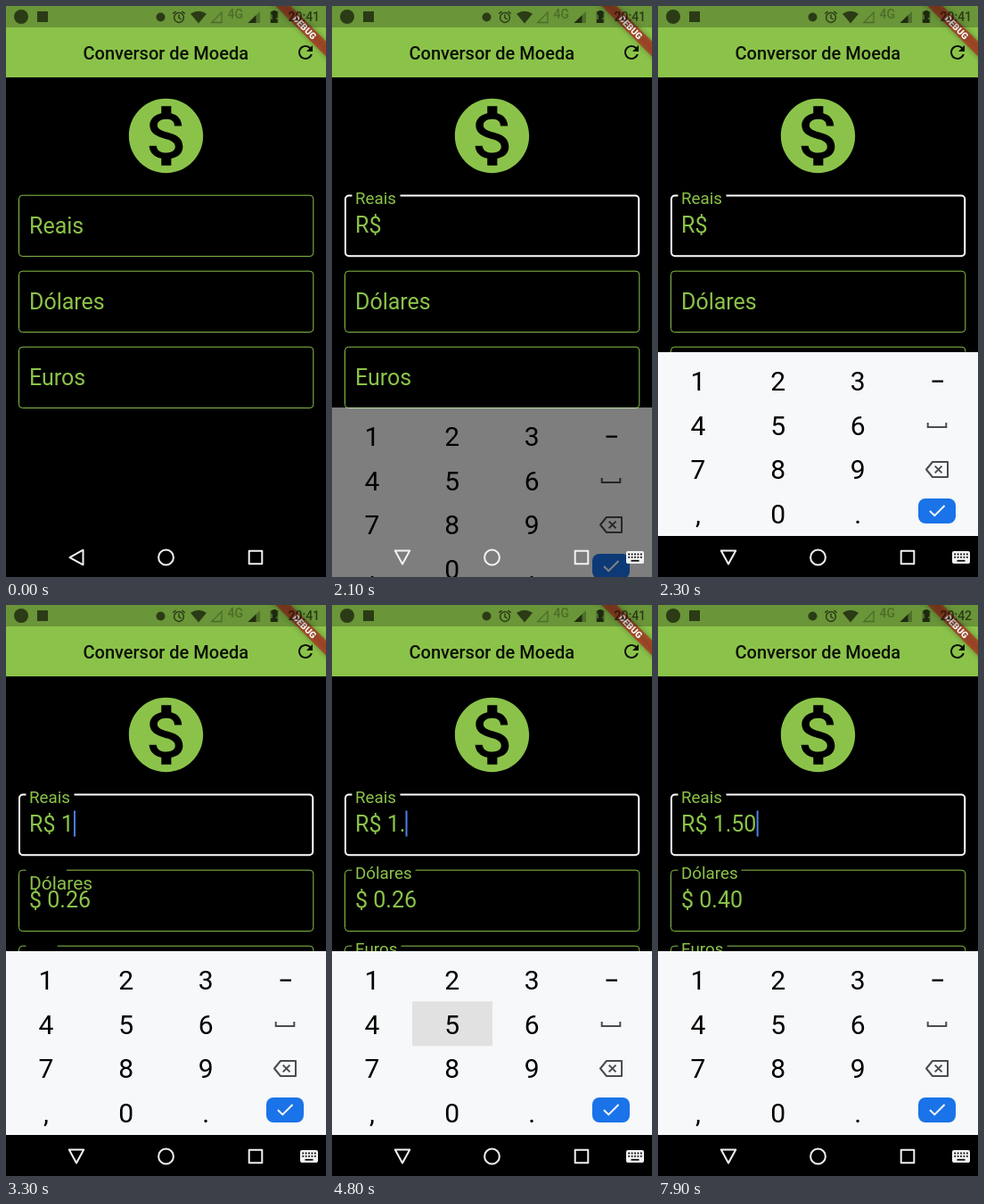
An HTML page for the animation above (8 s loop, 359 by 640 pixels).

```html
<!DOCTYPE html>
<html lang="pt">
<head>
<meta charset="utf-8">
<title>Conversor de Moeda</title>
<style>
  html, body { margin: 0; width: 100%; height: 100%; overflow: hidden; background: #000; }
  svg { display: block; width: 100%; height: 100%; font-family: Roboto, sans-serif; }
</style>
</head>
<body>
<svg id="stage" viewBox="0 0 359 640">
  <rect width="359" height="640"/>
  <rect width="359" height="80" fill="#8bc34a"/>
  <text x="179.3" y="60" font-size="20" font-weight="500" text-anchor="middle" fill="#0b1005">Conversor de Moeda</text>
  <path transform="translate(324 40)" fill="#0b1005" d="M17.65 6.35C16.2 4.9 14.21 4 12 4c-4.42 0-7.99 3.58-7.99 8s3.57 8 7.99 8c3.73 0 6.84-2.55 7.73-6h-2.08c-.82 2.33-3.04 4-5.65 4-3.31 0-6-2.69-6-6s2.69-6 6-6c1.66 0 3.14.69 4.22 1.78L13 11h7V4l-2.35 2.35z"/>
  <path transform="translate(129.5 95.5) scale(4.1667)" fill="#8bc34a" d="M12 2C6.48 2 2 6.48 2 12s4.48 10 10 10 10-4.48 10-10S17.52 2 12 2zm1.41 16.09V20h-2.67v-1.93c-1.71-.36-3.16-1.46-3.27-3.4h1.96c.1 1.05.82 1.87 2.65 1.87 1.96 0 2.4-.98 2.4-1.59 0-.83-.44-1.61-2.67-2.14-2.48-.6-4.18-1.62-4.18-3.67 0-1.72 1.39-2.84 3.11-3.21V4h2.67v1.95c1.86.45 2.79 1.86 2.85 3.39H14.3c-.05-1.11-.64-1.87-2.22-1.87-1.5 0-2.4.68-2.4 1.64 0 .84.65 1.39 2.67 1.91s4.18 1.39 4.18 3.91c-.02 1.83-1.38 2.83-3.12 3.16z"/>

  <g id="fields"></g>
  <rect id="cursor" width="2" fill="#4a80e8"/>

  <!-- ribbon -->
  <g transform="translate(359 0) rotate(45)">
    <rect x="-48" y="28" width="96" height="12" fill="#b71c1c" fill-opacity=".63" style="filter:drop-shadow(0 0 3px rgba(0,0,0,.5))"/>
    <text y="37.6" font-size="10.2" font-weight="900" text-anchor="middle" fill="#fff">DEBUG</text>
  </g>

  <!-- status bar -->
  <rect width="359" height="24" fill-opacity=".24"/>
  <g fill-opacity=".6" stroke-opacity=".6" fill="#000">
    <circle cx="17" cy="12" r="8"/>
    <rect x="35" y="6" width="12" height="12"/>
    <circle cx="173.5" cy="12.5" r="5"/>
    <g fill="none" stroke="#000" stroke-width="1.5">
      <circle cx="194" cy="13" r="5.4"/>
      <path d="M194 9.6V13.3L196.6 14.8M187.3 8.7L190.6 6M200.7 8.7L197.4 6"/>
    </g>
    <path d="M207 8.7Q216 2.6 225 8.7L216 19.5Z"/>
    <path d="M242 7V18.5H230.8Z" fill="none" stroke="#000" stroke-opacity=".27" stroke-width="1.3"/>
    <text x="248.5" y="13.8" font-size="14" font-weight="500" fill-opacity=".27">4G</text>
    <path d="M285 6V19H271.5Z" fill-opacity=".25"/>
    <path d="M280.5 10.3V19H271.5Z"/>
    <path d="M299.3 6V5H302.7V6H305.5V19H296.5V6Z" fill-opacity=".3"/>
    <path d="M299.3 6V5H302.7V6H304.5V13H303V15H304.5V19H297V15H299V10H297.5V6Z"/>
    <text id="clock" x="316.5" y="17" font-size="14" font-weight="500"></text>
  </g>
  <path id="wifi" d="M214.5 10L216.5 7.5L218.5 10M214.5 13L216.5 15.5L218.5 13" fill="none" stroke="#8bb65a" stroke-width="1"/>

  <!-- keyboard -->
  <g id="board">
    <rect y="388" width="359" height="206" fill="#f7f8fa"/>
    <rect y="594" width="359" height="180"/>
    <rect id="press" width="90" height="50" fill="#e1e1e2"/>
    <g id="keys" font-size="30" text-anchor="middle"></g>
    <rect x="307.5" y="419.5" width="12.5" height="2.3"/>
    <g fill="none" stroke="#4a4c50" stroke-width="2">
      <path d="M302.7 467V472H323.3V467"/>
      <path d="M308 511H325V528H308L301 519.5Z" stroke-linejoin="round"/>
      <path d="M310.7 515.6L318.5 523.4M318.5 515.6L310.7 523.4"/>
    </g>
    <rect x="292" y="552" width="42" height="28" rx="8" fill="#1a73e8"/>
    <path d="M305 566L310.3 571.2L321.5 560" fill="none" stroke="#fff" stroke-width="2"/>
  </g>

  <!-- navigation -->
  <g fill="none" stroke="#f2f2f2" stroke-width="2">
    <path id="back" stroke-linejoin="round"/>
    <circle cx="179.5" cy="618" r="8.4"/>
    <rect x="272.7" y="610.7" width="14.6" height="14.6" stroke-linejoin="round"/>
  </g>
  <g id="switcher">
    <rect x="330" y="611" width="20" height="14" rx="2" fill="#f2f2f2"/>
    <path d="M332.3 614.5H348M332.3 617.8H348" stroke="#111" stroke-width="1.8" stroke-dasharray="1.8 1.6"/>
    <path d="M335.5 621.8H344.5" stroke="#111" stroke-width="1.8"/>
  </g>
</svg>
<script>
const LOOP = 8000, STEP = 100, GREEN = '#8bc34a';
const $ = id => document.getElementById(id);

function add(parent, tag, attrs) {
  const el = document.createElementNS('http://www.w3.org/2000/svg', tag);
  set(el, attrs);
  parent.appendChild(el);
  return el;
}
function set(el, attrs) {
  for (const k in attrs) el.setAttribute(k, attrs[k]);
}
const show = (el, on) => el.setAttribute('visibility', on ? 'visible' : 'hidden');
const within = (t, spans) => spans.some(([a, b]) => t >= a && t < b);
// value of the latest [time, value] pair reached
const at = (t, steps) => steps.reduce((v, s) => t >= s[0] ? s[1] : v, steps[0][1]);

// fields: top edge and width of the shrunken label
const fields = [['Reais', 212, 46], ['Dólares', 297, 63], ['Euros', 382, 47]].map(([name, top, width]) => {
  const border = add($('fields'), 'path', { fill: 'none' });
  const label = add($('fields'), 'text', { x: 26, fill: GREEN });
  const value = add($('fields'), 'text', { x: 26, y: top + 42, fill: GREEN, 'font-size': 25 });
  label.textContent = name;
  return { top, width, border, label, value };
});

// lift: 0 = label resting inside, 1 = label on the border
function drawField(f, lift, text, focus) {
  const y = f.top + (focus ? .6 : .2), l = focus ? 15 : 14.5, r = focus ? 344.2 : 344.8;
  const b = y + (focus ? 67.6 : 68.4), gap = 22.5 + (f.width + 8) * lift;
  set(f.border, {
    d: `M${gap} ${y}H${r - 4}A4 4 0 0 1 ${r} ${y + 4}V${b - 4}A4 4 0 0 1 ${r - 4} ${b}H${l + 4}` +
       `A4 4 0 0 1 ${l} ${b - 4}V${y + 4}A4 4 0 0 1 ${l + 4} ${y}H22.5`,
    stroke: focus ? '#fff' : GREEN,
    'stroke-width': focus ? 2 : 1
  });
  set(f.label, { y: f.top + 43 - 33 * lift, 'font-size': 25 - 6.25 * lift });
  f.value.textContent = text;
}

// keyboard grid
const keyRow = row => 394.5 + row * 49.8;
['123', '456', '789', ',0.'].forEach((row, j) => [...row].forEach((c, i) => {
  add($('keys'), 'text', { x: 45 + i * 89.6, y: keyRow(j) + 36.3 }).textContent = c;
}));
const presses = [[3000, 0, 0], [4600, 2, 3], [4800, 1, 1]];   // time, column, row

const typed = [[0, ''], [3300, '1'], [4700, '1.'], [5000, '1.5'], [7000, '1.50']];
const dollars = [[0, ''], [3300, '$ 0.26'], [5000, '$ 0.40']];
const lifts = [[0, 0], [3300, .64], [3400, .95], [3500, 1]];
const caretOn = [[1700, 2000], [2500, 3000], [3300, 3700], [4200, 4600], [4700, 5500], [5900, 6400], [7000, 7400], [7900, 8000]];
const wifiOn = [[5100, 5300], [6400, 6500], [7300, 7400]];
const slide = [[0, 130], [2000, 112], [2100, 62], [2200, 14], [2300, 0]];
const fade = [[0, 0], [2000, .12], [2100, .51], [2200, .9], [2300, 1]];

function draw(ms) {
  const t = Math.floor(ms / STEP) * STEP;
  const open = t >= 1700, focus = t >= 1800, lift = at(t, lifts), text = at(t, typed);

  drawField(fields[0], focus ? 1 : 0, focus ? 'R$ ' + text : '', focus);
  drawField(fields[1], lift, at(t, dollars), false);
  drawField(fields[2], lift, '', false);

  const advance = [...text].reduce((w, c) => w + (c === '.' ? 6.6 : 14.04), 61.9);
  set($('cursor'), { x: advance, y: text ? 230.5 : 232.5, height: text ? 29 : 25.5 });
  show($('cursor'), within(t, caretOn));

  set($('board'), { transform: `translate(0 ${at(t, slide)})`, opacity: at(t, fade) });
  const hit = presses.find(p => t >= p[0] && t < p[0] + STEP);
  show($('press'), hit);
  if (hit) set($('press'), { x: hit[1] * 90, y: keyRow(hit[2]) });

  $('back').setAttribute('d', open ? 'M70.8 610.5H87.2L79 625.5Z' : 'M71.5 618L86.5 609.7V626.3Z');
  show($('switcher'), open);
  show($('wifi'), within(t, wifiOn));
  $('clock').textContent = t >= 5000 ? '20:42' : '20:41';
}

const start = performance.now();
function tick() {
  draw((performance.now() - start) % LOOP);
  requestAnimationFrame(tick);
}
tick();
</script>
</body>
</html>
```
